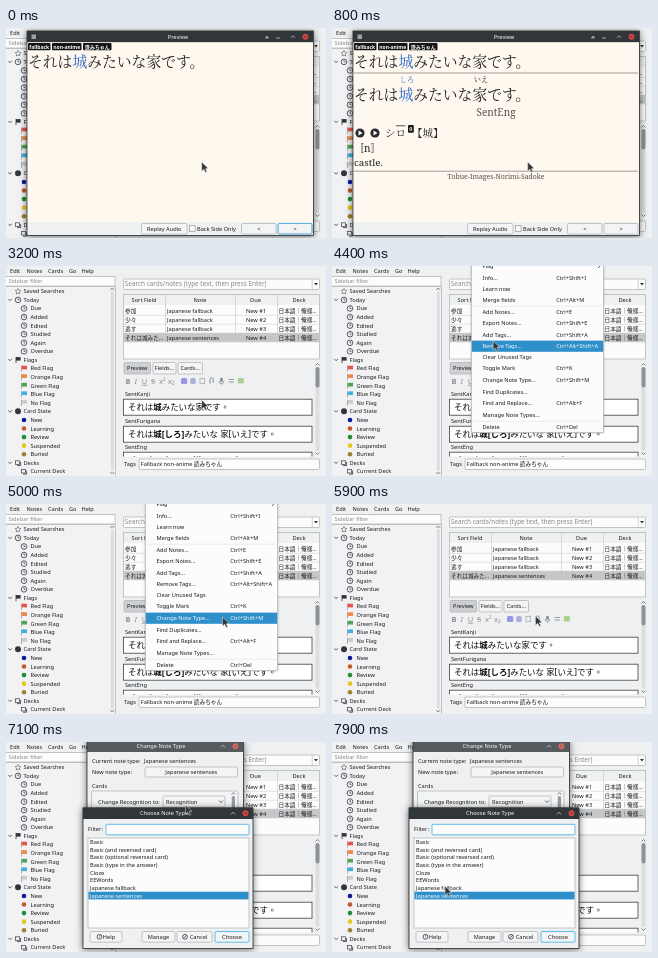
Animation, 320 px wide and 210 px high, one loop 8 s. Source, as an HTML page:

```html
<!DOCTYPE html>
<html lang="en">
<head>
<meta charset="utf-8">
<title>Changing a note type</title>
<style>
html, body { margin: 0; width: 100%; height: 100%; overflow: hidden; background: #eff0f1; }
svg { display: block; width: 100%; height: 100%; }
text { font: 5.65px "Noto Sans", "Noto Sans CJK JP", "Noto Sans CJK", sans-serif; fill: #181a1c; white-space: pre; }
.mid { text-anchor: middle; }
.dim { fill: #85888b; }
.light { fill: #fcfcfc; }
.icon { fill: #8d9093; font-size: 7.5px; }
.field { font: 500 8.45px "Noto Sans", "Noto Sans CJK TC", "Noto Sans CJK", sans-serif; fill: #0a0a0a; }
.serif { font-family: "Noto Serif", "Noto Serif CJK JP", "Noto Sans CJK JP", "Noto Sans CJK", serif; fill: #222; }
.card { font-size: 14.8px; font-weight: 300; }
.b { font-weight: 700; }
.blue { fill: #2a66c8; }
.window { filter: drop-shadow(0 1.5px 3.5px rgba(0, 0, 0, .55)); }
.popup { filter: drop-shadow(0 .5px 1px rgba(0, 0, 0, .25)); }
</style>
</head>
<body>
<svg id="stage" viewBox="0 0 320 210" xmlns="http://www.w3.org/2000/svg"></svg>
<script>
const LOOP = 8000, STEP = 100;
const PANEL = '#eff0f1', BORDER = '#b4b7b9', ACCENT = '#3daee9', DARK = '#31363b';

const rect = (x, y, w, h, fill, stroke, extra = '') =>
  `<rect x="${x}" y="${y}" width="${w}" height="${h}" fill="${fill}" ${stroke ? `stroke="${stroke}" stroke-width=".8"` : ''} ${extra}/>`;
const text = (x, y, s, cls = '', base = 2) => `<text x="${x}" y="${y + base}" class="${cls}">${s}</text>`;
const dot = (x, y, r, fill, stroke = 'none') =>
  `<circle cx="${x}" cy="${y}" r="${r}" fill="${fill}" stroke="${stroke}" stroke-width=".8"/>`;
const line = (d, color = DARK, w = .8) => `<path d="${d}" fill="none" stroke="${color}" stroke-width="${w}"/>`;
const chevron = (x, y, up = 1) => line(`M${x - 2} ${y + up}l2 ${-2 * up}l2 ${2 * up}`, '#5c6165');
const group = (id, body, cls = '') => `<g id="${id}" class="${cls}">${body}</g>`;

function button(x, y, w, h, label, focus = false, shift = 0, fill = '#f3f4f5') {
  return rect(x, y, w, h, fill, focus ? ACCENT : BORDER, 'rx="1.2"') +
    text(x + w / 2 + shift, y + h / 2, label, 'mid');
}
function combo(x, y, w, label) {
  return rect(x, y, w, 11, '#f3f4f5', BORDER, 'rx="1"') + text(x + 3, y + 5.5, label);
}
function titleBar(x, y, w, h, label, cls = 'light') {
  const cx = x + w - 7.5, cy = y + h / 2;
  return rect(x, y, w, h, DARK) + text(x + w / 2 + (w > 200 ? 8 : -4), cy, label, 'mid ' + cls) +
    dot(cx, cy, 2.9, '#d8463f') + line(`M${cx - 1} ${cy - 1}l2 2m0 -2l-2 2`, DARK, .7) +
    line(`M${cx - 14.5} ${cy + 1}l2 -2l2 2`, '#dcdedf', .7);
}

// ---- Browser: sidebar
const ROW = 8.575;
const flag = c => y => line(`M15.5 ${y - 3}v6.2`, '#777', .6) + rect(15.8, y - 2.8, 5.2, 3.7, c);
const ball = c => y => dot(18, y, 2.3, c);
const clockAt = x => y => dot(x, y, 2.8, 'none', '#33383c') + line(`M${x} ${y - 1.7}v1.8h1.4`, '#33383c', .7);
const clock = clockAt(18);
const deck = (x, y) => rect(x - 2.5, y - 2, 4, 3.6, 'none', '#4d5257') + line(`M${x - 1} ${y + 2.8}h3.6v-3.6`);
const heads = {
  'Saved Searches': y => line(`M12 ${y - 2.8}l.9 1.8 2 .3-1.5 1.4.4 2-1.8-1-1.8 1 .4-2-1.5-1.4 2-.3z`, '#55595d', .6),
  'Today': clockAt(12),
  'Flags': y => line(`M10 ${y - 3}v6.2`, DARK) + rect(10, y - 2.8, 4.6, 3.5, DARK),
  'Card State': y => dot(12, y, 3, DARK),
  'Decks': y => deck(12, y)
};
const tree = [
  ['Saved Searches'], ['Today'],
  ...['Due', 'Added', 'Edited', 'Studied', 'Again', 'Overdue'].map(s => [s, clock]),
  ['Flags'], ['Red Flag', flag('#e4564c')], ['Orange Flag', flag('#ec8a45')], ['Green Flag', flag('#4da653')],
  ['Blue Flag', flag('#3fb1e5')], ['No Flag', flag('#c9cbcd')],
  ['Card State'], ['New', ball('#10189c')], ['Learning', ball('#c3592a')], ['Review', ball('#1c8f38')],
  ['Suspended', ball('#e2c81f')], ['Buried', ball('#98852a')],
  ['Decks'], ['Current Deck', y => deck(18, y)]
];

function sidebar() {
  let s = rect(0, 0, 320, 210, PANEL) + rect(-1, 10.5, 110, 9.5, '#fcfcfc', BORDER) +
    text(2.5, 15, 'Sidebar filter', 'dim') + rect(-1, 20.5, 110.5, 191, '#f2f2f4', BORDER) +
    rect(105, 25, 2.6, 180, '#d9dbdd', '', 'rx="1.3"') + chevron(106.3, 23) + chevron(106.3, 207, -1);
  [['Edit', 4], ['Notes', 20.5], ['Cards', 42], ['Go', 63], ['Help', 75.5]].forEach(([m, x]) => s += text(x, 5, m));
  tree.forEach(([label, icon], i) => {
    const y = 25.3 + i * ROW;
    if (icon) return s += icon(y) + text(24.5, y, label);
    s += heads[label](y) + text(17.5, y, label);
    if (i) s += line(`M2.3 ${y - 1}l1.8 1.8l1.8 -1.8`);
  });
  return s;
}

// ---- Browser: table and editor
function cardTable() {
  let s = rect(117.5, 13, 196, 10.5, '#fcfcfc', BORDER, 'rx="1"') +
    `<text x="118.8" y="20" class="dim" style="font-size:6.4px">Search cards/notes (type text, then press Enter)</text>` +
    line('M306.2 13v10.5', BORDER, .6) + `<path d="M308 17h4l-2 2.5z" fill="${DARK}"/>` +
    rect(117.5, 28.5, 196, 64.5, '#fcfcfc', BORDER) + rect(118, 29, 195, 10, PANEL);
  [['Sort Field', 138], ['Note', 194], ['Due', 249.5], ['Deck', 293]].forEach(([h, x]) => s += text(x, 34, h, 'mid'));
  s += rect(118, 67, 195, 9, '#c4c6c8');
  const rows = [['参加', 'Japanese fallback'], ['少々', 'Japanese fallback'], ['逃す', 'Japanese fallback'], ['それは城みた…', 'Japanese sentences']];
  rows.forEach(([kanji, note], i) => {
    const y = 44.8 + i * 8.9;
    s += line(`M118 ${y + 4.5}h195`, '#cdcfd0', .6) + text(119, y, kanji) + text(161, y, note) +
      text(240, y, 'New #' + (i + 1)) + text(272.5, y, '日本語｜俺様…');
  });
  return s + line('M159.5 29v47M229.5 29v47M271.5 29v47', '#c2c4c6', .6);
}

function toolbar() {
  const marks = [['B', 119.5], ['<tspan font-style="italic">I</tspan>', 128.5],
    ['<tspan text-decoration="underline">U</tspan>', 135.8], ['<tspan text-decoration="line-through">S</tspan>', 145], ['x²', 153], ['x₂', 162]];
  let s = marks.map(([m, x], i) => text(x, 115, m, i ? 'icon' : 'icon b', 2.8)).join('');
  s += rect(175, 112, 6.2, 6, '#9496e6', '', 'rx="1.5"') + rect(184.2, 112, 5.6, 6, '#a9b2dc', '', 'rx="1.5"') +
    rect(194, 112.3, 4.6, 5.4, 'none', '#a5a8aa');
  s += line('M204 117.5v-4a1.6 1.6 0 0 1 3.2 0v3.2', '#85898c', 1) + rect(214.2, 111.8, 2.6, 4.2, '#85898c', '', 'rx="1.3"') +
    line('M213 115a2.5 2.5 0 0 0 5 0M215.5 117.5v1.2', '#85898c') + line('M222.5 113.5h5.5M222.5 116h5.5', '#85898c') +
    rect(231.8, 112, 6, 5.6, '#a9d08e', '', 'rx="1"');
  return s;
}

function editor() {
  const box = (y, label, body) => text(119, y, label) + rect(117.5, y + 5.2, 188.5, 16, '#fff', '#3c4043') + text(122, y + 13.2, body, 'field', 3.1);
  return button(118, 96.5, 26.5, 11.5, 'Preview', false, 0, '#cdcfd1') + button(147, 96.5, 23, 11.5, 'Fields...') + button(172, 96.5, 24.5, 11.5, 'Cards...') +
    toolbar() + '<clipPath id="pane"><rect x="112" y="95" width="208" height="95.5"/></clipPath><g clip-path="url(#pane)">' +
    box(128, 'SentKanji', 'それは<tspan class="b">城</tspan>みたいな家です。') +
    box(155, 'SentFurigana', 'それは<tspan class="b">城[しろ]</tspan>みたいな 家[いえ]です。') +
    box(181, 'SentEng', '<tspan class="b">That is a house like a castle.</tspan>') + '</g>' +
    rect(309.5, 101, 4, 84, '#dcdee0', '', 'rx="2"') + rect(309.5, 101, 4, 20.5, '#8f9295', '', 'rx="2"') +
    chevron(311.5, 98.5) + chevron(311.5, 187.5, -1) +
    text(118, 198, 'Tags') + rect(133, 193, 180.5, 10.5, '#fcfcfc', BORDER, 'rx="1"') +
    text(134.8, 198, 'Fallback non-anime 読みちゃん');
}

// ---- Preview window
const kanji = (y) => text(22, y, 'それは<tspan class="blue">城</tspan>みたいな家です。', 'serif card', 5.4);

function preview() {
  const tag = (x, w, s) => rect(x, 15, w, 7.2, '#141414', '', 'rx="1"') +
    `<text x="${x + w / 2}" y="20.5" class="mid light b" style="font-size:5px">${s}</text>`;
  const play = x => dot(x, 105, 4.6, '#2b2b2b') + `<path d="M${x - 1.5} 102.5l4 2.5l-4 2.5z" fill="#fff"/>`;
  const sized = (x, y, px, s, cls, fill) => `<text x="${x}" y="${y}" class="serif ${cls}" style="font-size:${px}px;${fill ? 'fill:' + fill : ''}">${s}</text>`;
  const answer = line('M22 45h284', '#77736f', .7) +
    sized(75, 53.6, 7.2, 'しろ', 'mid blue') + sized(149, 53.6, 7.2, 'いえ', 'mid') + kanji(67) +
    sized(164, 88, 10.1, 'SentEng', 'mid', '#594c4a') + play(28) + play(43) +
    sized(53, 109, 10.5, 'シロ', '') + line('M64 97.8h9.5', '#222') +
    rect(76, 97, 5.8, 7.8, '#161616', '', 'rx="1"') + sized(78.9, 103, 5.6, '0', 'mid b', '#fff') +
    sized(80, 109, 10.5, '【城】', '') + sized(22, 123.6, 10, '〚n〛', '') + sized(22, 137.5, 9.8, 'castle.', '') +
    line('M22 143.2h284', '#77736f', .7) + sized(164, 150.6, 6.9, 'Tobue-Images-Norimi-Sadoke', 'mid', '#594c4a');
  return rect(21, 3, 286.5, 204.5, PANEL, '#25292c') + titleBar(21, 3, 286, 11.5, 'Preview') +
    line('M270 10h4M259.5 10l1.5 -2l1.5 2z', '#dcdedf', .7) + rect(25.5, 6.5, 4.5, 4.5, '#9da1a4') +
    rect(21.8, 14.3, 285, 179.7, '#fff8ef') +
    tag(22, 22.5, 'fallback') + tag(46, 29.5, 'non-anime') + tag(77, 28.5, '読みちゃん') + kanji(34) +
    group('answer', answer) +
    button(135.5, 195.5, 45.5, 10.5, 'Replay Audio') + rect(183.5, 197.7, 5.6, 5.6, '#fcfcfc', '#9a9da0') +
    text(191, 200.7, 'Back Side Only') + button(235.5, 195.5, 34.5, 10.5, '&lt;') +
    button(272, 195.5, 34, 10.5, '&gt;') + group('focus', rect(272, 195.5, 34, 10.5, 'none', ACCENT, 'rx="1.2"'));
}

// ---- Context menu
const items = [
  ['Flag', 0], ['Info...', 12, 'Ctrl+Shift+I'], ['Learn now', 23], ['Merge fields', 34, 'Ctrl+Alt+M'],
  ['Add Notes...', 46, 'Ctrl+E'], ['Export Notes...', 57, 'Ctrl+Shift+E'], ['Add Tags...', 69, 'Ctrl+Shift+A'],
  ['Remove Tags...', 80, 'Ctrl+Alt+Shift+A'], ['Clear Unused Tags', 91], ['Toggle Mark', 102, 'Ctrl+K'],
  ['Change Note Type...', 114, 'Ctrl+Shift+M'], ['Find Duplicates...', 126], ['Find and Replace...', 137, 'Ctrl+Alt+F'],
  ['Manage Note Types...', 149], ['Delete', 161, 'Ctrl+Del']
];
function menu() {
  return rect(139.5, -5, 132, 171.5, '#fcfcfc', '#b9bcbe') +
    line('M141 40.2h129M141 155.2h129', '#dcdee0', .6) +
    rect(139.8, 0, 131.4, 11.2, '#2f8fcb', '', 'id="hover"') + line('M266 -2l2 2l-2 2') +
    items.map(([s, y, key]) => `<g class="item">${text(150.5, y, s)}${key ? text(224.3, y, key) : ''}</g>`).join('');
}

// ---- Dialogs
const helpIcon = (x, y) => dot(x, y, 2.4, 'none', DARK) + `<text x="${x}" y="${y + 1.5}" class="mid" style="font-size:4px">?</text>`;
const cancelIcon = (x, y) => dot(x, y, 2.4, 'none', DARK) + line(`M${x - 1.6} ${y + 1.6}l3.2 -3.2`);
const okIcon = (x, y) => line(`M${x - 2} ${y}l1.5 1.7l3 -3.4`);

function changeDialog() {
  const frame = (y, h) => rect(85.5, y, 146.5, h, '#f3f4f5', BORDER, 'rx="1"') +
    rect(225.8, y + 5, 3.2, h - 10, '#d9dbdd', '', 'rx="1.6"') + rect(225.8, y + 5, 3.2, (h - 10) * .6, '#989b9e', '', 'rx="1.6"') +
    chevron(227.4, y + 2.6) + chevron(227.4, y + h - 2.6, -1);
  let s = rect(81, -1, 156.5, 179, PANEL, '#25292c') + group('title', titleBar(81, -1.5, 156, 11.5, 'Change Note Type')) +
    text(86, 19, 'Current note type:') + text(138, 19, 'Japanese sentences') +
    text(86, 30, 'New note type:') + button(139, 25, 92.5, 10, 'Japanese sentences') +
    text(86, 44, 'Cards') + frame(49, 33);
  ['Recognition', 'Production'].forEach((c, i) => {
    const y = 59.5 + i * 13.7;
    s += text(92, y, `Change ${c} to:`) + combo(157, y - 5.5, 62, c) + line(`M213 ${y - 1}l2 2l2 -2`);
  });
  s += text(86, 90, 'Fields') + frame(95, 57);
  s += '<clipPath id="fields"><rect x="86" y="96" width="138" height="52.5"/></clipPath><g clip-path="url(#fields)">';
  ['SentKanji', 'SentFurigana', 'SentEng', 'SentAudio'].forEach((f, i) => {
    const y = 105 + i * 13.8;
    s += text(92, y, `Change ${f} to:`) + combo(179, y - 5.5, 62, f);
  });
  return s + '</g>' + rect(91, 148.8, 128, 2.2, '#d9dbdd', '', 'rx="1.1"') + rect(91, 148.8, 92, 2.2, '#989b9e', '', 'rx="1.1"') +
    button(87, 161, 33, 11, 'Help', false, 3) + helpIcon(97.5, 166.5) +
    button(159, 161, 35, 11, 'Cancel', false, 4) + cancelIcon(167, 166.5) +
    button(198, 161, 34, 11, 'OK', true, 3) + okIcon(208.5, 166.5);
}

function chooseDialog() {
  const types = ['Basic', 'Basic (and reversed card)', 'Basic (optional reversed card)', 'Basic (type in the answer)',
    'Cloze', 'EEWords', 'Japanese fallback', 'Japanese sentences'];
  return rect(77, 66, 170, 140.5, PANEL, '#25292c') + titleBar(77, 65.5, 170, 11.5, 'Choose Note Type') +
    text(82, 87, 'Filter:') + rect(100, 82.3, 143, 10.5, '#fcfcfc', ACCENT, 'rx="1"') +
    rect(82, 96, 161, 90, '#fcfcfc', BORDER) + rect(82.5, 149.7, 160, 7.7, '#2f8fcb') +
    types.map((s, i) => text(84, 100.2 + i * 7.63, s, i === 7 ? 'light' : '')).join('') +
    button(84, 189.5, 32, 10.7, 'Help', false, 3) + helpIcon(93.5, 194.8) + button(136, 189.5, 33, 10.7, 'Manage') +
    button(171, 189.5, 35, 10.7, 'Cancel', false, 4) + cancelIcon(179, 194.8) + button(209, 189.5, 34, 10.7, 'Choose', true);
}

document.getElementById('stage').innerHTML = sidebar() + cardTable() + editor() +
  group('preview', preview(), 'window') + group('menu', menu(), 'popup') +
  group('change', changeDialog(), 'window') + group('choose', chooseDialog(), 'window') +
  '<path id="cursor" d="M0 0V9.2L2.2 7.3L3.7 10.4L5.2 9.7L3.8 6.7L6.5 6.4Z" fill="#31363b" stroke="#e8e9ea" stroke-width=".5"/>';

// ---- Motion
const path = [
  [0, 195.7, 134], [3200, 195.7, 134], [4000, 140, 71], [4200, 140, 71], [4700, 200, 82], [4900, 215, 104],
  [5000, 216.5, 113], [5700, 203.5, 112], [6400, 203.5, 112], [6800, 181, 27], [7000, 181, 28],
  [7200, 178, 98], [7900, 113, 144], [LOOP, 113, 144]
];
const shown = { preview: [0, 3200], menu: [4100, 5900], change: [6000, LOOP], choose: [7100, LOOP], focus: [0, 500] };
const $ = id => document.getElementById(id);
const rows = [...document.querySelectorAll('.item')];

function pointer(t) {
  const i = path.findIndex(p => p[0] > t);
  const [t0, x0, y0] = path[i - 1], [t1, x1, y1] = path[i];
  const k = (t - t0) / (t1 - t0), e = k * k * (3 - 2 * k);
  return [x0 + (x1 - x0) * e, y0 + (y1 - y0) * e];
}

function draw(time) {
  const t = Math.floor((time % LOOP) / STEP) * STEP;
  for (const id in shown) $(id).style.display = t >= shown[id][0] && t < shown[id][1] ? '' : 'none';
  $('answer').style.opacity = Math.max(0, Math.min(1, (t - 400) / 400));
  $('title').style.opacity = t >= 7100 ? .8 : 1;

  const [x, y] = pointer(t);
  $('cursor').setAttribute('transform', `translate(${x} ${y})`);
  const over = x > 141 ? items.findIndex(m => Math.abs(m[1] - y) <= 5.8) : -1;
  rows.forEach((g, i) => g.querySelectorAll('text').forEach(n => n.classList.toggle('light', i === over)));
  $('hover').style.display = over < 0 ? 'none' : '';
  if (over >= 0) $('hover').setAttribute('y', items[over][1] - 5.4);
}

const start = performance.now();
function tick() {
  draw(performance.now() - start);
  requestAnimationFrame(tick);
}
tick();
</script>
</body>
</html>
```
